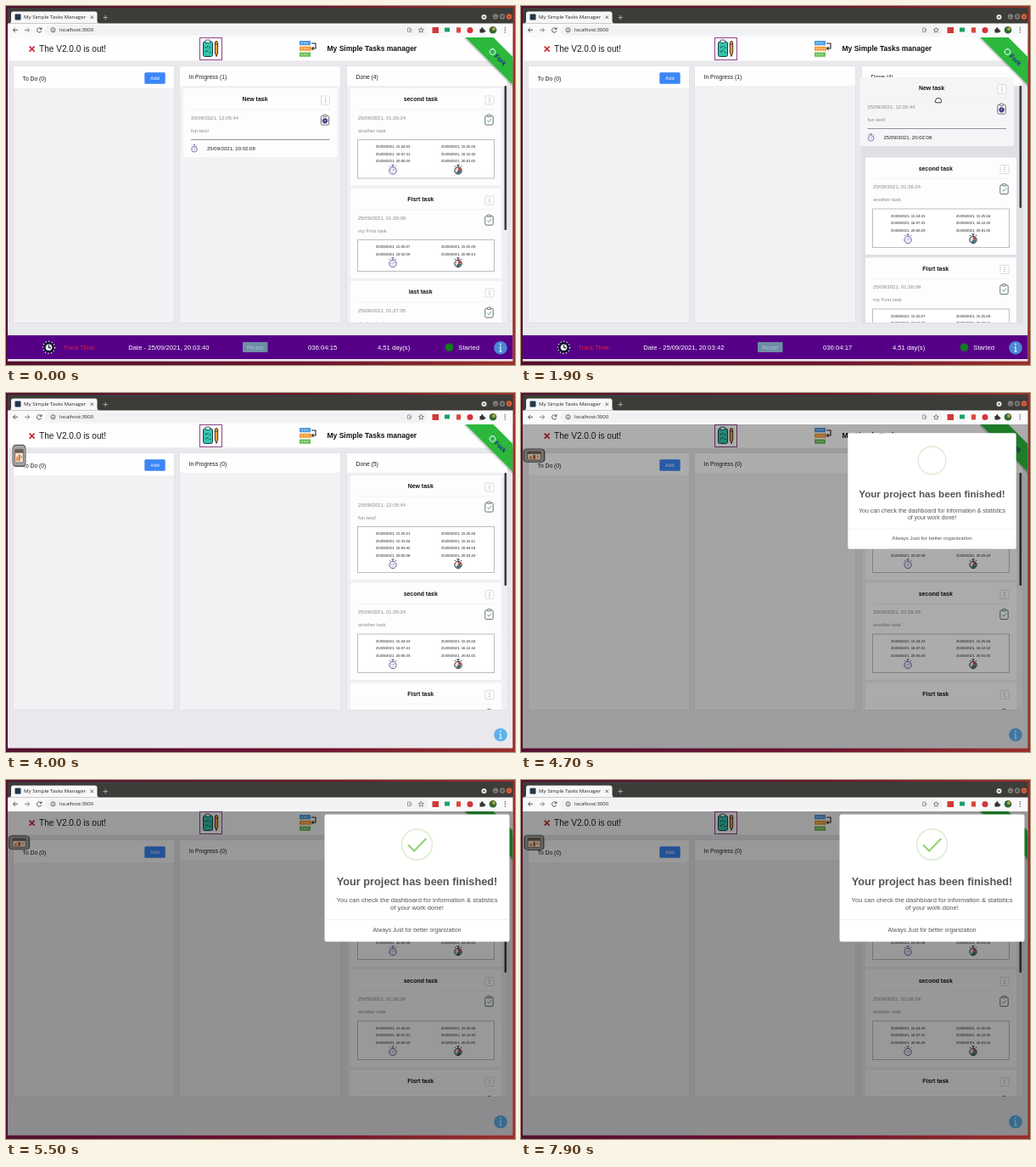
Write an HTML page that moves like this. It is 600 px wide and 423 px high and loops after 8000 ms.

```html
<!DOCTYPE html>
<html lang="en">
<head>
<meta charset="utf-8">
<title>Task board</title>
<style>
html, body { margin: 0; width: 100%; height: 100%; overflow: hidden; background: #4a1228; }
svg { display: block; width: 600px; height: 423px; }
text { font-family: "Liberation Sans", Arial, sans-serif; white-space: pre; }
.ui { font-family: "Open Sans", "Noto Sans", sans-serif; }
</style>
</head>
<body>
<svg id="stage" viewBox="0 0 600 423" xmlns="http://www.w3.org/2000/svg">
  <defs>
    <linearGradient id="desk"><stop offset="0" stop-color="#541030"/><stop offset=".6" stop-color="#6d1430"/><stop offset="1" stop-color="#9a302a"/></linearGradient>
    <clipPath id="listClip"><rect x="402" y="94" width="189" height="279"/></clipPath>
    <clipPath id="pageClip"><rect x="2" y="37" width="595.5" height="381.5"/></clipPath>
    <g id="watch" fill="none" stroke="#5d5590" stroke-width=".9">
      <circle cy="1" r="4.2" fill="#f3f1fb"/><path d="M-1.6-5.6H1.6M0-5.4V-3.4M3-3.4L4.2-4.6M-3-3.4L-4.2-4.6"/>
      <path d="M0 1L1.8-.8" stroke="#8c4a9c"/><path d="M-2.4 1H-1.6M0 3.4V2.8" stroke-width=".6"/>
    </g>
    <g id="pie" fill="none" stroke="#2b2b38" stroke-width="1">
      <circle cy="1" r="4.2" fill="#d9e4e2"/><path d="M-1.6-5.6H1.6M0-5.4V-3.4M3-3.4L4.2-4.6M-3-3.4L-4.2-4.6"/>
      <path d="M0 1V-2.4A3.4 3.4 0 0 1 3.4 1Z" fill="#d2413a" stroke="none"/>
      <path d="M0 1H3.4A3.4 3.4 0 0 1-2.4 3.4Z" fill="#3c6f72" stroke="none"/>
    </g>
    <g id="clip">
      <rect x="-4.7" y="-4.8" width="9.4" height="10.6" rx="1.4" fill="#fff" stroke="#566160" stroke-width=".9"/>
      <rect x="-2.2" y="-6.2" width="4.4" height="2.4" rx=".9" fill="#e6eaea" stroke="#566160" stroke-width=".8"/>
    </g>
  </defs>
</svg>
<script>
const LOOP = 8000;
const svg = document.getElementById("stage");

function el(parent, tag, attrs) {
  const node = document.createElementNS(svg.namespaceURI, tag);
  for (const k in attrs) node.setAttribute(k, attrs[k]);
  parent.appendChild(node);
  return node;
}
const group = (p, attrs) => el(p, "g", attrs);
const rect = (p, x, y, width, height, fill, more) => el(p, "rect", { x, y, width, height, fill, ...more });
const dot = (p, cx, cy, r, fill, more) => el(p, "circle", { cx, cy, r, fill, ...more });
const path = (p, d, stroke, w = 1, more) => el(p, "path", { d, stroke, "stroke-width": w, fill: "none", ...more });
const use = (p, id, x, y, scale = 1) => el(p, "use", { href: "#" + id, transform: `translate(${x} ${y}) scale(${scale})` });
function text(p, str, x, y, size, fill, more) {
  const node = el(p, "text", { x, y, "font-size": size, fill, ...more });
  node.textContent = str;
  return node;
}
const MID = { "text-anchor": "middle" };
const BOLD = { ...MID, "font-weight": 700 };

/* browser window */
function drawWindow(p) {
  rect(p, 0, 0, 600, 423, "url(#desk)");
  rect(p, 2, 2, 595.5, 19, "#3d3c39");
  el(p, "path", { d: "M3 20.5Q6 20.5 6 17V9Q6 6.5 8.5 6.5H105Q107.5 6.5 107.5 9V17Q107.5 20.5 110.5 20.5Z", fill: "#f7f7f8" });
  rect(p, 10.5, 9.5, 7, 7, "#22374a", { rx: 1 });
  text(p, "My Simple Tasks Manager", 21, 15.4, 6.1, "#222", { class: "ui" });
  path(p, "M99.5 11.5L103 15M103 11.5L99.5 15", "#444", .8);
  path(p, "M114.5 13.5H120M117.2 10.7V16.3", "#bbb", .8);
  dot(p, 563.5, 13, 3, "#e8e8e6");
  dot(p, 563.5, 13, 1.1, "#444");
  [577, 585, 593].forEach((x, i) => dot(p, x, 12.5, 3.2, i < 2 ? "#7d7b75" : "#e2613a"));
  path(p, "M575.8 13.5H578.2M584 11.5H586V13.5H584ZM592 11.5L594 13.5M594 11.5L592 13.5", "#33322e", .7);

  rect(p, 2, 20.5, 595.5, 16.5, "#fafafa");
  rect(p, 46, 22.5, 451, 12, "#f1f2f4", { rx: 6 });
  path(p, "M14 28.3H8.5M11 25.7L8.4 28.3L11 30.9", "#444", .9);
  path(p, "M22 28.3H27.5M25 25.7L27.6 28.3L25 30.9", "#777", .9);
  path(p, "M41.5 27A2.7 2.7 0 1 0 41.8 29.3M42 25.2V27.4H39.8", "#444", .9);
  dot(p, 55.5, 28.3, 2.5, "none", { stroke: "#444", "stroke-width": .8 });
  path(p, "M55.5 28V29.8M55.5 26.7V27.2", "#444", .8);
  text(p, "localhost:3000", 63, 30.4, 5.95, "#1c1c1c", { class: "ui" });
  path(p, "M473.5 26H477V30.5H473.5ZM475.5 28.5H478.5", "#777", .7);
  path(p, "M489.3 25.4L490.2 27.4L492.3 27.6L490.7 29L491.2 31.1L489.3 30L487.4 31.1L487.9 29L486.3 27.6L488.4 27.4Z", "#555", .7);
  rect(p, 502.5, 25, 7.5, 7, "#cf3a38");
  rect(p, 517, 25.5, 6, 5, "#1ba06a");
  rect(p, 531, 25.3, 5, 6.2, "#d9473c");
  dot(p, 547, 28.4, 3.5, "#d3333a");
  path(p, "M558.5 27H560.3A1.2 1.2 0 1 1 562.3 27H563.5V28.5A1.2 1.2 0 1 1 563.5 30.5V31.5H558.5Z", "none", 0, { fill: "#333" });
  dot(p, 574, 28.3, 4.3, "#2f6b35");
  dot(p, 575, 27, 2, "#b6a248");
  [25.7, 28.3, 30.9].forEach(y => dot(p, 588.3, y, .7, "#444"));
}

/* page header */
function drawHeader(p) {
  rect(p, 2, 37, 595.5, 27.5, "#fefefe");
  path(p, "M27.6 47.7L33.6 53.7M33.6 47.7L27.6 53.7", "#d1303a", 1.9);
  text(p, "The V2.0.0 is out!", 39, 53.7, 10.1, "#1c1c1c");

  rect(p, 228.5, 37.5, 26, 26, "#fff", { stroke: "#8d4488", "stroke-width": 1 });
  rect(p, 232.5, 42, 11, 17.5, "#35c6ae", { rx: 2, stroke: "#173c48", "stroke-width": 1 });
  rect(p, 235, 40, 5.5, 3.5, "#dff5ef", { rx: 1, stroke: "#173c48", "stroke-width": .8 });
  path(p, "M234.5 48L236 49.3L238.5 46.7M234.5 53L236 54.3L238.5 51.7M239.5 49H241.5M239.5 54.5H241.5", "#173c48", .9);
  el(p, "path", { d: "M246.3 43Q248 39.5 249.7 43V55L248 59.5L246.3 55Z", fill: "#eda13b", stroke: "#35231c", "stroke-width": .9 });
  path(p, "M246.5 45H249.5", "#35231c", .8);

  rect(p, 346, 41, 13, 5.3, "#4f9be0");
  rect(p, 346, 47.7, 14, 5, "#f39a33");
  rect(p, 346, 54.5, 13, 5.3, "#6cbf56");
  path(p, "M348 43.7H357M348 50.2H358M348 57.2H357", "#fff", .7, { "stroke-dasharray": "2 1" });
  path(p, "M360 44H365V50H361M362.5 48.2L360.7 50L362.5 51.8", "#222", 1.1);
  text(p, "My Simple Tasks manager", 378.5, 53.3, 8.5, "#111", { "font-weight": 700 });
}

function drawRibbon(p) {
  path(p, "M541 37.5L598 94.5", "#000", 2.5, { opacity: .16 });
  el(p, "path", { d: "M541.5 37H574.5L597.5 60V93Z", fill: "#2cb83c" });
  const g = group(p, { transform: "translate(573.5 54) rotate(45)" });
  dot(g, 0, 0, 3.2, "none", { stroke: "#d8f5ff", "stroke-width": 1 });
  text(g, "Fork", 5, 2.6, 7.6, "#1e2c86", { "font-weight": 700 });
}

function kebab(p, x, y) {
  rect(p, x - 5, y - 5, 10, 10, "#fff", { rx: 1, stroke: "#d2d2d4", "stroke-width": .8 });
  [-2, 0, 2].forEach(d => dot(p, x, y + d, .6, "#777"));
}

/* one card, its top left corner at 0,0 */
function card(p, w, title, date, note) {
  const g = group(p);
  g.box = rect(g, 0, 0, w, 81, "#fdfdfe", { rx: 1.5 });
  text(g, title, w / 2 - 6.3, 15, 6.95, "#111", BOLD);
  kebab(g, w - 14, 14);
  path(g, `M9 25H${w - 9}`, "#eeeef1", .7);
  text(g, date, 9, 36.5, 5.95, "#858589");
  text(g, note, 9, 51.8, 5.95, "#8b8b8f");
  use(g, "clip", w - 14.5, 37.3);
  return g;
}

function doneCard(p, title, date, note, rows) {
  const w = 178, g = card(p, w, title, date, note);
  const h = 20 + rows.length * 8.5;
  g.box.setAttribute("height", 69 + h);
  rect(g, 8.5, 60.5, 161, h, "#fff", { stroke: "#bdbdbf", "stroke-width": 1 });
  rows.forEach(([from, to], i) => {
    const y = 70.1 + i * 8.5;
    text(g, "25/09/2021, " + from, 30, y, 4.27, "#111");
    text(g, "25/09/2021, " + to, 107, y, 4.27, "#111");
  });
  const iconY = 70.5 + rows.length * 8.5;
  use(g, "watch", 50, iconY);
  use(g, "pie", 127, iconY);
  path(g, `M${w - 16.7} 38L${w - 15} 39.7L${w - 12} 36`, "#4fa574", 1);
  return g;
}

function column(p, x, title, y) {
  rect(p, x - .5, 70.5, 190, 303, "#dddce1", { rx: 1.5 });
  const body = rect(p, x, 71, 189, 302, "#f2f1f4");
  rect(p, x, 71, 189, x < 20 ? 26 : 23, "#fefefe");
  const label = text(p, title, x + 10.6, y, 6.75, "#1c1c1c");
  return { body, label };
}

drawWindow(svg);
const page = group(svg, { "clip-path": "url(#pageClip)" });
rect(page, 2, 37, 595.5, 382, "#e9e8ec");
drawHeader(page);

column(page, 9, "To Do (0)", 87.5);
rect(page, 163.3, 78.3, 24.4, 13.4, "#3b86f7", { rx: 1.5 });
text(page, "Add", 175.5, 87.1, 5.8, "#fff", MID);
const doing = column(page, 205, "In Progress (1)", 86);
const done = column(page, 402, "Done (4)", 86);
drawRibbon(page);

const list = group(page, { "clip-path": "url(#listClip)" });
const fresh = doneCard(list, "New task", "25/09/2021, 12:05:44", "fun test!",
  [["15:25:21", "15:25:24"], ["15:31:04", "15:31:11"], ["16:03:45", "16:04:18"], ["20:02:08", "20:03:43"]]);
fresh.setAttribute("transform", "translate(406 97)");
const older = group(list);
[
  [0, "second task", "01:26:24", "another task", [["15:24:33", "15:25:04"], ["16:07:31", "16:12:32"], ["20:00:29", "20:01:05"]]],
  [118, "Fisrt task", "01:26:09", "my First task", [["15:25:07", "15:25:09"], ["19:52:00", "20:00:13"]]],
  [227, "last task", "01:27:05", "the last task", [["15:25:12", "15:25:15"]]],
].forEach(([y, title, time, note, rows]) =>
  doneCard(older, title, "25/09/2021, " + time, note, rows).setAttribute("transform", `translate(406 ${97 + y})`));
const thumb = rect(page, 587.5, 94, 2.6, 170, "#3e3c42", { rx: 1 });

const footer = group(page);
rect(footer, 2, 388, 595.5, 28, "#560088");
rect(footer, 2, 416, 595.5, 2.5, "#eae4ee");
dot(footer, 50.5, 402.3, 7, "#1c0f40", { stroke: "#e8e2d4", "stroke-width": 1.4, "stroke-dasharray": "1.3 2.3" });
dot(footer, 50.5, 402.3, 5.3, "#15122c");
dot(footer, 50.5, 402.3, 3.8, "#e6edf2");
path(footer, "M50.5 399.5V402.3L53 403", "#15122c", 1.1);
text(footer, "Track Time:", 67.3, 404.7, 7.4, "#e3203c");
const clock = text(footer, "", 144.3, 404.7, 7.65, "#fff");
rect(footer, 279, 396, 29.5, 12, "#6d8ea6", { rx: 1 });
text(footer, "Reset", 293.7, 404.7, 7.4, "#a8bac8", MID);
const timer = text(footer, "", 356, 404.7, 7.7, "#fff");
text(footer, "4,51 day(s)", 438, 404.7, 7.65, "#fff");
dot(footer, 522.5, 402.2, 4.8, "#14861f");
[1.5, 3.6].forEach(r => dot(footer, 522.5, 402.2, r, "none", { stroke: "#0b4a16", "stroke-width": .8, "stroke-dasharray": "1 1.2" }));
text(footer, "Started", 533.3, 404.7, 7.65, "#fff");

const info = dot(page, 583, 402.7, 7.8, "#5cb2ee");
path(page, "M583 401.5V407M581.5 407H584.5M581.7 401.5H583", "#d3eafa", 1.4);
dot(page, 583, 398.5, 1.1, "#d3eafa");

/* dashboard button, centred on 0,0 */
const dash = group(page);
rect(dash, -10, -10, 20, 20, "#a5a5a2", { rx: 4, stroke: "#55555a", "stroke-width": 1.1 });
rect(dash, -6.5, -6, 13, 12.5, "#f3e7cf", { rx: 1, stroke: "#6b5b4a", "stroke-width": .8 });
rect(dash, -6.5, -6, 13, 3.5, "#6b5d55");
rect(dash, -4.5, 1, 2.2, 4, "#e0873a");
rect(dash, -1, -1, 2.2, 6, "#c8503c");
rect(dash, 2.5, 0, 2.2, 2.5, "#e0a04a");

/* card being dragged */
const drag = card(page, 181.5, "New task", "25/09/2021, 12:05:44", "fun test!");
path(drag, "M9 60.5H172.5", "#949498", 1);
use(drag, "watch", 13, 71, .8);
text(drag, "25/09/2021, 20:02:08", 28, 72.8, 6, "#1c1c1c");
dot(drag, 167, 38.3, 2, "#8f86d0", { stroke: "#3a327c", "stroke-width": 1.6 });
dot(drag, 167, 38.3, 3.2, "none", { stroke: "#3a327c", "stroke-width": .9, "stroke-dasharray": "1.2 1.3" });

const hand = el(page, "path", {
  d: "M-3.3 2.8Q-4.5 .5-3-.6Q-2.5-2.6-1-2Q0-3.2 1-2Q2.6-2.6 3-.8Q4 .6 3 2.8Z",
  fill: "#fff", stroke: "#222", "stroke-width": .9
});

/* dialog */
const shade = rect(page, 2, 37, 595.5, 382, "#000");
const popup = group(page);
rect(popup, 375.5, 40.5, 218, 150, "#fff", { rx: 2.5 });
dot(popup, 484.5, 76, 18, "none", { stroke: "#e2efd9", "stroke-width": 1.9 });
const tick = path(popup, "M474 76.5L481.2 83.5L495.3 69", "#94d374", 2.2, { pathLength: 1, "stroke-dasharray": "1 2" });
text(popup, "Your project has been finished!", 484.5, 123.6, 12.75, "#545454", BOLD);
text(popup, "You can check the dashboard for information & statistics", 484.5, 143.8, 7.65, "#545454", MID);
text(popup, "of your work done!", 484.5, 152.6, 7.65, "#545454", MID);
path(popup, "M375.5 164.5H593.5", "#eee", .8);
text(popup, "Always Just for better organization", 484.5, 179.2, 6.8, "#545454", MID);

/* rows of [time, value, ...], straight lines between */
function track(rows, t) {
  const i = rows.findIndex(r => r[0] > t);
  if (i < 0) return rows[rows.length - 1].slice(1);
  if (i === 0) return rows[0].slice(1);
  const a = rows[i - 1], b = rows[i], k = (t - a[0]) / (b[0] - a[0]);
  return a.slice(1).map((v, j) => v + (b[j + 1] - v) * k);
}
const show = (node, on) => node.setAttribute("display", on ? "inline" : "none");
const clamp = v => Math.min(1, Math.max(0, v));

const DRAG = [[700, 0, 0], [1300, 97, -1], [1600, 150, -8], [1900, 190.5, -13], [2100, 190.5, -13], [2350, 192, -11], [2600, 197, 0]];
const HAND = [[300, 345, 150], [700, 331, 119], [1300, 427.5, 118.5], [1900, 492, 111], [2350, 494, 112]];
const SHIFT = [[1500, 0], [1700, 81.5], [2799, 81.5], [2800, 126.5]];
const THUMB = [[1500, 170], [1700, 144], [2799, 144], [2800, 133]];
const RUBBER = [[0, 1, 1], [.3, 1.25, .75], [.4, .75, 1.25], [.5, 1.15, .85], [.65, .95, 1.05], [.75, 1.05, .95], [1, 1, 1]];
const POP = [[0, .7], [135, 1.05], [240, .95], [300, 1]];
const MOVED = 2800, STOPPED = 3100, ASKED = 4620;

function render(t) {
  const moved = t >= MOVED, running = t < STOPPED;
  doing.label.textContent = `In Progress (${moved ? 0 : 1})`;
  done.label.textContent = `Done (${moved ? 5 : 4})`;
  done.body.setAttribute("fill", t > 1500 && t < 2700 ? "#e0dfe3" : "#f0eff3");

  const [dx, dy] = track(DRAG, t);
  drag.setAttribute("transform", `translate(${209 + dx} ${97 + dy})`);
  drag.box.setAttribute("fill", t > 700 && t < 2600 ? "#f5f4f6" : "#fdfdfe");
  show(drag, !moved);
  show(fresh, moved);
  older.setAttribute("transform", `translate(0 ${track(SHIFT, t)[0]})`);
  thumb.setAttribute("height", track(THUMB, t)[0]);

  hand.setAttribute("transform", `translate(${track(HAND, t).join(" ")})`);
  show(hand, t >= 300 && t < 2600);

  const sec = Math.floor((t + 200) / 1000);
  clock.textContent = `Date - 25/09/2021, 20:03:${40 + sec}`;
  timer.textContent = `036:04:${15 + sec}`;
  show(footer, running);
  info.setAttribute("fill", running ? "#4a88d6" : "#5cb2ee");

  show(dash, !running);
  const phase = ((t - 4000) / 820 + 4.4) % 1;
  dash.setAttribute("transform", `translate(15.5 73.8) scale(${track(RUBBER, phase).join(" ")})`);

  const age = t - ASKED;
  show(shade, age >= 0);
  show(popup, age >= 0);
  shade.setAttribute("opacity", .4 * clamp(age / 100));
  popup.setAttribute("transform", `translate(484.5 115.5) scale(${track(POP, age)[0]}) translate(-484.5 -115.5)`);
  const drawn = clamp((age - 405) / 345);
  show(tick, drawn > 0);
  tick.setAttribute("stroke-dashoffset", 1 - drawn);
}

const start = performance.now();
function frame() {
  render((performance.now() - start) % LOOP);
  requestAnimationFrame(frame);
}
frame();
</script>
</body>
</html>
```
